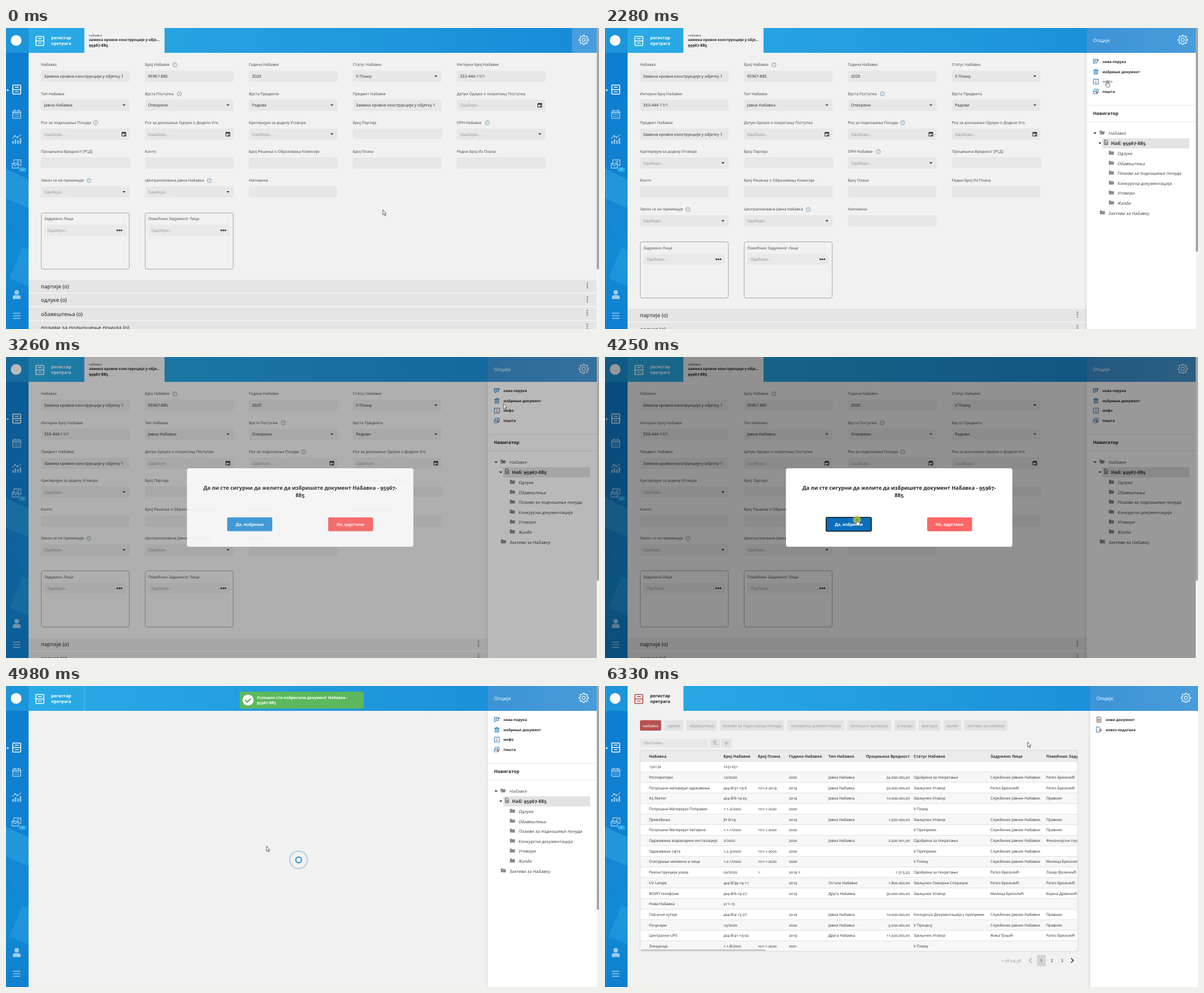
Recreate the animation shown at these times as an HTML page. Size 1051 px wide and 533 px high, loop 6420 ms.

```html
<!DOCTYPE html>
<html lang="sr">
<head>
<meta charset="utf-8">
<title>Регистар</title>
<style>
html,body{margin:0;height:100%;overflow:hidden;background:#f1f1f1}
svg{display:block;width:100vw;height:100vh}
text{font-family:'Noto Sans','Open Sans',sans-serif;text-rendering:geometricPrecision;white-space:pre}
.b{font-weight:700}
.o{font-variant-numeric:oldstyle-nums}
</style>
</head>
<body>
<svg id="stage" viewBox="0 0 1051 533"></svg>
<script>
const LOOP = 6420;
const rect = (x, y, w, h, fill, rx = 0, more = '') =>
  `<rect x="${x}" y="${y}" width="${w}" height="${h}" fill="${fill}" rx="${rx}" ${more}/>`;
const path = (d, fill, stroke = 'none', width = 1) =>
  `<path d="${d}" fill="${fill}" stroke="${stroke}" stroke-width="${width}"/>`;
const circle = (x, y, r, fill, stroke = 'none', width = 1) =>
  `<circle cx="${x}" cy="${y}" r="${r}" fill="${fill}" stroke="${stroke}" stroke-width="${width}"/>`;
const at = (x, y, body, more = '') => `<g transform="translate(${x} ${y})" ${more}>${body}</g>`;
const group = (id, body, more = '') => `<g id="${id}" ${more}>${body}</g>`;
// y is the middle of the capitals
const text = (x, y, s, size, fill = '#333', cls = 'o', more = '') =>
  `<text x="${x}" y="${(y + size * .36).toFixed(2)}" font-size="${size}" fill="${fill}" class="${cls}" ${more}>${s}</text>`;
const slanted = (x, y, s, size, fill) =>
  `<g transform="translate(${x} ${y + size * .36}) skewX(-11)">${text(0, -size * .36, s, size, fill)}</g>`;
const middle = 'text-anchor="middle"';
const dots = (x, y, dx, dy, r, fill) => [-1, 0, 1].map(i => circle(x + i * dx, y + i * dy, r, fill)).join('');
const caret = (x, y, fill = '#222') => path(`M${x - 2.6} ${y - 1.2}h5.2l-2.6 2.7z`, fill);

// ---- icons, centred on 0,0
const cabinet = c => rect(-7, -8, 14, 16, 'none', 1.5, `stroke="${c}" stroke-width="1.6"`) +
  path('M-7 0H7M-2.5 -3.2v-1h5v1M-2.5 4.6v-1h5v1', 'none', c, 1.4);
const folder = c => path('M-4.5 -3.4h3.4l1 1.2h4.6v5.6h-9z', c);
const openFolder = c => path('M-4.5 3.2v-6.4h3.4l1 1.2h4v1.3h-6.4zM-3.7 3.4l1.8-4.2h7l-1.8 4.2z', c);
const gear = () => {
  const pts = Array.from({length: 32}, (_, i) => {
    const a = (i - .5) * Math.PI / 16, r = i % 4 < 2 ? 8.4 : 6.3;
    return `${(r * Math.cos(a)).toFixed(1)} ${(r * Math.sin(a)).toFixed(1)}`;
  });
  return path(`M${pts.join('L')}z`, 'none', '#fff', 1.2) + circle(0, 0, 2.8, 'none', '#fff', 1.2);
};
const calendar = c => rect(-7, -6, 14, 13, 'none', 1.5, `stroke="${c}" stroke-width="1.6"`) +
  path('M-7 -3H7M-3.5 -8.5v3M3.5 -8.5v3', 'none', c, 1.8) +
  path('M-4 0h2M-1 0h2M2 0h2M-4 3.5h2M-1 3.5h2M2 3.5h2', 'none', c, 1.7);
const smallCalendar = path('M-3.5 -2.8h7v6.3h-7zM-2 -4.2v1.5M2 -4.2v1.5', 'none', '#222', 1) +
  rect(-3.5, -3, 7, 2, '#222') + rect(.3, .6, 2, 2, '#222');
const chart = c => path('M-6.5 8v-5M-2.2 8v-8M2.2 8v-6M6.5 8v-10', 'none', c, 2.6) +
  path('M-8 -1L-3 -6L1 -3L8 -8', 'none', c, 1.3) + circle(-3, -6, 1.4, c) + circle(1, -3, 1.4, c);
const mails = c => path('M-8 -1.5h11v8.5h-11zl5.5 4.5l5.5 -4.5M-5 -2v-5.5h12.5v9.5h-3.5M0 -4.5h5', 'none', c, 1.4);

// ---- sidebar and top bar
const dim = 'rgba(255,255,255,.58)';
const sidebar = rect(0, 0, 40, 533, 'url(#side)') +
  path('M0 249L40 268V319L0 302z', 'rgba(70,185,235,.35)') +
  path('M0 302L40 319V390L0 340z', 'rgba(30,140,215,.3)') +
  path('M29 389L40 392V458L6 443z', 'rgba(60,175,235,.3)') +
  rect(0, 0, 40, 44, '#1c95da') + circle(18, 22, 9.5, '#fff') +
  circle(3, 110, 1.6, '#fff') + at(19, 109, cabinet('#fff')) +
  at(19, 153, calendar(dim)) + at(19, 197, chart(dim)) + at(19, 241, mails(dim)) +
  rect(22.5, 247, 13, 7.5, '#2bace4', 3.7) + text(29, 250.7, '3', 4.6, '#fff', '', middle) +
  at(19, 472, circle(0, -4, 4, dim) + path('M-7 8v-3q0-4 4-4h6q4 0 4 4v3z', dim)) +
  path('M12.5 505h13M12.5 509.5h13M12.5 514h13', 'none', dim, 1.7);
const registerTab = (icon, ink) => at(60, 23, cabinet(icon)) +
  text(80, 17, 'регистар', 7.5, ink, 'b') + text(80, 27.5, 'претрага', 7.5, ink, 'b');
const topBar = rect(40, 0, 1007, 44, 'url(#top)') + registerTab('#fff', '#fff') +
  rect(138.5, 0, .8, 44, 'rgba(255,255,255,.35)');
const documentTab = rect(139, 0, 142, 44, '#f1f1f1') + text(147, 12.5, 'набавка', 5.7, '#444') +
  text(147, 21, 'замена кровне конструкције у обје...', 6.5, '#222', 'b') +
  text(147, 30.5, '95967-885', 6.9, '#222', 'b o');

// ---- form: label|value|kind (v select, d date, w wide)|help offset
const pick = 'Одабери...';
const fields = `Набавка|Замена кровне конструкције у објетку 1
Број Набавке|95967-885||53
Година Набавке|2020
Статус Набавке|У Плану|v
Интерни Број Набавке|333-444-11/1
Тип Набавке|Јавна Набавка|v
Врста Поступка|Отворени|v|61
Врста Предмета|Радови|v
Предмет Набавке|Замена кровне конструкције у објетку 1
Датум Одлуке о покретању Поступка|${pick}|d
Рок за подношење Понуда|${pick}|d|97
Рок за доношење Одлуке о Додели Уго.|${pick}|d
Критеријум за доделу Уговора|${pick}|v
Број Партија||w
ОРН Набавке|${pick}|v|54
Процењена Вредност [РСД]||w
Конто
Број Решења о Образовању Комисије
Број Плана
Редни Број Из Плана
Закон се не примењује|${pick}|v|85
Централизована Јавна Набавка|${pick}|v|114
Напомена`.split('\n').map(s => s.split('|'));
const ink = s => s === pick ? '#999' : '#333';
const field = ([label, value = '', kind, help]) =>
  text(0, 65, label, 6.75, '#4a4a4a', '') +
  rect(0, 75.5, kind === 'w' ? 158.5 : 157, kind === 'w' ? 18.5 : 20, '#e7e7e7', 2) +
  text(5.5, 85.6, value, 7.2, ink(value), '') +
  (kind === 'v' ? caret(147, 85.4) : kind === 'd' ? at(147, 85.5, smallCalendar) : '') +
  (help ? circle(help, 65.3, 3.7, 'none', '#5d87a3', .8) + text(help, 65.4, '?', 5.6, '#5d87a3', '', middle) : '');
const personBox = (x, title) => at(x, 0,
  rect(.5, 327.5, 156, 99.5, 'none', 3.5, 'stroke="#9a9a9a" stroke-width=".9"') +
  text(6, 338, title, 6.75, '#4a4a4a', '') + rect(6, 348.5, 145, 19.5, '#e9e9e9', 2) +
  text(11.5, 358.2, pick, 7.1, '#999', '') + dots(139, 358.3, 3.6, 0, 1.5, '#333'));
const sections = ['партије (0)', 'одлуке (0)', 'обавештења (0)', 'позиви за подношење понуда (0)'];
const form = (cols, right) => {
  const shift = cols === 4 ? 51.2 : 0;
  return rect(40, 44, right - 40, 489, '#f1f1f1') +
    fields.map((f, i) => at(62 + i % cols * 184.25, Math.floor(i / cols) * 51.2, field(f))).join('') +
    at(0, shift, personBox(62, 'Задужено Лице') + personBox(246.2, 'Помоћник Задуженог Лица') +
      sections.map((s, i) => at(0, i * 24.15, rect(40, 446.3, right - 40, 22, '#e5e5e5') +
        text(62, 457.8, s, 9.6, '#222') + dots(right - 16.7, 456, 0, 4, 1.5, '#999'))).join(''));
};

// ---- side panels
const panelBase = (x, right) => rect(x - 6, 44, 6, 489, 'url(#shade)') + rect(x, 44, right - x, 489, '#fff') +
  rect(x, 0, right - x, 44, 'url(#panelTop)') + text(x + 11, 22, 'Опције', 8.5, '#fff');
const blue = '#1878b8', red = '#d33f3f';
const optionIcons = [
  path('M-4.5 -4h7v6h-4l-2 2v-2h-1zM-2.8 -2h4M-2.8 0h3', 'none', blue, 1) + circle(3.6, -2.5, 1.4, red),
  path('M-3 -2.2h6v6.7h-6zM-4.5 -2.6h9M-1.5 -4.3h3M-1 -1v4M1 -1v4', 'none', blue, 1.1),
  path('M-4.3 -4.3h8.6v8.6h-8.6z', 'none', blue, 1) + path('M0 -1v3.5M0 -2.9v1', 'none', red, 1.2),
  `<g transform="scale(.58)">${mails(blue)}</g>` + circle(2.2, 2, 1.6, red),
  path('M-3.5 -4.5h5l2 2v7h-7z', 'none', '#444', 1) + path('M0 -1.8v4.6M-2.2 .6h4.4', 'none', red, 1.3),
  path('M-4.5 -4.5h4.5l2 2v7h-6.5z', 'none', blue, 1) + path('M-1 1h6M3 -1l2 2l-2 2', 'none', red, 1)
];
const option = (x, y, icon, label, id) => at(x, y, optionIcons[icon]) +
  text(x + 11.7, y, label, 6.45, '#222', 'b', `id="${id}"`);
const rule = y => rect(854, y, 193, .8, '#dedede');
const tree = ['Одлуке', 'Обавештења', 'Позиви за подношење понуда', 'Конкурсна документација', 'Уговори', 'Жалбе'];
const panel = panelBase(854, 1047) +
  ['нова порука', 'избриши документ', 'инфо', 'пошта'].map((s, i) => option(870, 59.6 + i * 17.65, i, s, 'opt' + i)).join('') +
  rule(136.5) + text(865, 151.5, 'Навигатор', 8, '#222', 'b') + rule(165.7) +
  caret(868.5, 186.2) + at(881, 185, openFolder('#888')) + slanted(892, 186.3, 'Набавке', 7.6, '#555') +
  rect(881.5, 195.3, 154, 18, '#e3e3e3') + caret(877, 204) +
  at(888, 202.5, path('M-2.8 -4h3.8l1.8 2v6h-5.6zM-1.4 0h2.8M-1.4 2h2.8', 'none', '#444', 1)) +
  text(897, 204.3, 'Наб: 95967-885', 8.2, '#333', 'b o') +
  tree.map((s, i) => at(897.5, 221 + i * 17.6, folder('#8c8c8c')) + slanted(908, 222.2 + i * 17.6, s, 7.55, '#444')).join('') +
  at(881.5, 326.5, folder('#8c8c8c')) + slanted(892, 327.8, 'Захтеви за Набавку', 7.55, '#444');

// ---- search page
const tabs = [['набавке', 62, 37.5], ['одлуке', 105.5, 33], ['обавештења', 144.5, 53.5],
  ['позиви за подношење понуда', 203.5, 114], ['конкурсна документација', 323, 101.5],
  ['питања и одговори', 429.5, 77.5], ['уговори', 513, 37.5], ['фактуре', 556, 38.5],
  ['жалбе', 600, 31], ['захтеви за набавку', 636.5, 76.5]];
const columns = [78, 210, 271, 326, 396, 540, 547, 683, 782];
const heads = 'Набавка|Број Набавке|Број Плана|Година Набавке|Тип Набавке|Процењена Вредност|Статус Набавке|Задужено Лице|Помоћник Задуженог Лица';
const clerk = 'Службеник Јавних Набавки', officer = 'Ратко Брезолић', lady = 'Милица Брезолић';
const open = 'Јавна Набавка', other = 'Друга Набавка', signed = 'Закључен Уговор', approved = 'Одобрена за покретање';
const rows = `132132|1231231
Респиратори|12/2020||2020|${open}|24.000.000,00|${approved}|${clerk}|${officer}
Потрошни материјал одржавање|404-8/31-19-6|101-2-2019|2019|${open}|50.000.000,00|${signed}|${officer}|${officer}
A3 Skener|404-8/6-19-25||2019|${open}|10.000.000,00|${signed}|${clerk}|Правник
Потрошни Материјал Поправке|1.1.2/2020|101-1-2020|2020|||У Плану
Превођење|ЈН 6/19||2019|${open}|1.500.000,00|${signed}|${clerk}|Правник
Потрошни Материјал Хигијена|1.1.1/2020|101-1-2020|2020|||У Припреми|${clerk}|Правник
Одржавање водоводних инсталација|2/2020||2020|${open}|2.500.001,00|${approved}|${clerk}|Финансијски службеник
Одржавање сајта|1.2.3/2020|101-1-2020|2020|||У Припреми|${clerk}
Осигурање имовине и лица|1.2.1/2020|101-1-2020|2020|||У Плану|${clerk}|${lady}
Реконструкција улаза|02/2020|1|2019.1||1.515,55|${approved}|${officer}|Лазар Врлинкић
UV Lampe|404-8/39-19-11||2019|Остале Набавке|1.800.000,00|Закључен Оквирни Споразум|${officer}|${officer}
ВОИП телефони|404-8/6-19-27||2019|${other}|30.000.000,00|${signed}|${lady}|Бојана Дрвенкић
Нова Набавка|211-15
Гласачке кутије|404-8/4-13-27||2019|${open}|10.000.000,00|Конкурсна Документација у припреми|${clerk}|Правник
Рачунари|15/2020||2020|${open}|5.000.000,00|У Процесу|${clerk}|Правник
Централни UPS|404-8/41-19-02||2019|${other}|11.500.000,00|${signed}|Жика Трњић|${officer}
Линценце|1.1.8/2020|101-1-2020|2021|||У Плану`.split('\n');
const cells = (line, y, size, cls) => line.split('|').map((s, i) =>
  s && text(columns[i], y, s, size, '#333', cls, i === 5 ? 'text-anchor="end"' : '')).join('');
const table = rect(62, 114, 776, 356, '#fff') + rect(62, 114, 776, 19.4, '#ebebeb') + cells(heads, 124, 6.95, 'b') +
  rows.map((r, i) => rect(62, 133.4 + i * 18.7, 776, 18.7, i % 2 ? '#f7f7f7' : '#fff') +
    rect(62, 133 + i * 18.7, 776, .8, '#dadada') + cells(r, 142.8 + i * 18.7, 6.6, 'o')).join('') +
  rect(64, 466.6, 221, 2.4, '#c2c2c2', 1);
const search = rect(40, 0, 1011, 533, '#f1f1f1') + rect(139, 0, 912, 44, 'url(#top)') +
  registerTab('#b04a48', '#222') +
  tabs.map(([s, x, w], i) => rect(x, 60.5, w, 18.5, i ? '#e3e3e3' : '#b8504f', 2) +
    text(x + w / 2, 70, s, 7.05, i ? '#9b9b9b' : '#fff', '', middle)).join('') +
  rect(62, 93, 121, 16, '#e8e8e8', 2) + slanted(68, 101, 'Претражи...', 6.7, '#999') +
  rect(186, 93, 18, 16, '#e2e2e2', 2) + path('M191 97.5h7l-2.7 3.2v3.8l-1.6-1.2v-2.6zM197 102l3 3m0-3l-3 3', '#bbb', '#bbb', .8) +
  rect(206, 93, 18, 16, '#e2e2e2', 2) + path('M215 97.2v7.6M211.2 101h7.6', 'none', '#b5b5b5', 1.6) +
  `<g clip-path="url(#tableClip)">${table}</g>` +
  rect(62, 114, 776, 356, 'none', 2, 'stroke="#cfcfcf" stroke-width=".8"') +
  text(702, 486.3, '1-18 од 38', 7.4, '#999') + path('M756 482l-4 4l4 4', 'none', '#999', 1.2) +
  rect(765.5, 476.3, 15.5, 20, '#d4d4d4', 2) +
  [773, 791.8, 810].map((x, i) => text(x, 486.3, i + 1, 7.4, '#333', '', middle)).join('') +
  path('M826 482l4 4l-4 4', 'none', '#222', 1.4) +
  panelBase(860, 1051) + option(875.5, 59.6, 4, 'нови документ', 'new') + option(875.5, 77.2, 5, 'извоз података', 'export') +
  at(1029.5, 21, gear());

// ---- dialog, toast, spinner, pointer
const dialog = rect(320.7, 197, 401.3, 139, '#fff', 4) +
  text(521.3, 231.5, 'Да ли сте сигурни да желите да избришете документ Набавка - 95967-', 9.27, '#222', 'b o', middle) +
  text(521.3, 244.5, '885', 9.27, '#222', 'b o', middle) +
  rect(392, 284, 80, 24.5, '#3498db', 2, 'id="yes"') + text(432, 296.4, 'Да, избриши', 7.25, '#fff', 'b', middle) +
  rect(571, 284, 79.6, 24.5, '#ff6666', 2) + text(610.6, 296.4, 'Не, одустани', 7.25, '#fff', 'b', middle);
const toast = rect(414, 10, 220, 30, '#5cb85c', 3) + circle(429, 25, 9.8, '#fff') +
  path('M424 25l3.6 3.6l6.4-6.6', 'none', '#5cb85c', 2.4) +
  text(444.5, 20.5, 'Успешно сте избрисали документ Набавка -', 6.95, '#fff', 'b') +
  text(444.5, 29.3, '95967-885', 6.95, '#fff', 'b o');
const spinner = `<circle id="outer" cx="518.6" cy="307.8" r="16" fill="none" stroke="#abd0ea" stroke-width="2"/>` +
  `<circle id="inner" cx="518.6" cy="307.8" r="5.7" fill="none" stroke="#2b95d3" stroke-width="2"/>`;
const arrow = path('M0 0V9L2 7.2L3.6 10.5L5 9.9L3.5 6.6H6z', '#fff', '#333', .8);
const hand = path('M-.9 .8q.9-1.4 1.8 0V5l3.2.8q1 .3.8 1.4L4.3 10q-.3 1.6-1.6 1.6h-2.4q-1 0-1.6-1L-3.4 7.4q-.1-1.3 1.2-.9L-.9 7.4z', '#fff', '#333', .8);

const gradient = (id, stops, more = '') => `<linearGradient id="${id}" ${more}>` +
  stops.map(([o, c, a = 1]) => `<stop offset="${o}" stop-color="${c}" stop-opacity="${a}"/>`).join('') + '</linearGradient>';
document.getElementById('stage').innerHTML = '<defs>' +
  gradient('top', [[0, '#2aabe5'], [1, '#188ad7']], 'gradientUnits="userSpaceOnUse" x1="40" x2="1047"') +
  gradient('side', [[0, '#0d7dd0'], [.45, '#1080d0'], [.75, '#128ad4'], [1, '#0f80d0']], 'x2="0" y2="1"') +
  gradient('panelTop', [[0, '#3c93d6'], [1, '#489cda']]) +
  gradient('shade', [[0, '#000', 0], [1, '#000', .05]]) +
  '<clipPath id="tableClip"><rect x="62" y="114" width="775.5" height="356" rx="2"/></clipPath></defs>' +
  rect(0, 0, 1051, 533, '#f1f1f1') + group('topBar', topBar) + group('documentTab', documentTab) +
  group('wide', form(5, 1047)) + group('narrow', form(4, 854)) +
  rect(1003, 0, 44, 44, '#489edc') + group('panel', panel) + at(1024, 21, gear()) +
  rect(1047, 0, 4, 533, '#f4f4f4') + rect(1047, 0, 4, 427, '#a6a6a6', 0, 'id="thumb"') +
  group('search', search) + sidebar + rect(0, 0, 1047, 533, '#000', 0, 'id="veil"') +
  group('dialog', dialog) + group('spinner', spinner) + group('toast', toast) +
  group('pointer', `<circle id="press" cx="-.5" cy="1.3" r="7" fill="#b4cc32" fill-opacity=".8"/>` +
    group('arrow', arrow) + group('hand', hand));

const el = Object.fromEntries([...document.querySelectorAll('[id]')].map(e => [e.id, e]));
const show = (id, on) => el[id].setAttribute('display', on ? 'inline' : 'none');
const set = (id, name, value) => el[id].setAttribute(name, value);

const ticks = [0, ...[[140, 760, 9], [850, 1490, 9], [1580, 2220, 9], [2280, 2610, 5], [2760, 2840, 2],
  [3000, 3640, 9], [3700, 3790, 2], [3950, 4020, 2], [4250, 4430, 3], [4580, 5170, 8], [5240, 5240, 1],
  [5390, 5390, 1], [5530, 6100, 9], [6180, 6330, 3]].flatMap(([a, b, n]) =>
  Array.from({length: n}, (_, i) => n > 1 ? a + (b - a) * i / (n - 1) : a))];

const track = (keys, t) => {
  const i = keys.findIndex(k => k[0] > t);
  if (i < 0) return keys.at(-1).slice(1);
  if (i === 0) return keys[0].slice(1);
  const [a, b] = [keys[i - 1], keys[i]], p = (t - a[0]) / (b[0] - a[0]);
  return a.slice(1).map((v, j) => v + (b[j + 1] - v) * p);
};
const pointerKeys = [[70, 668, 322], [450, 850, 175], [760, 1004, 46], [930, 1016, 20], [1580, 1015, 22],
  [2220, 890, 93], [2280, 890, 93], [2610, 893, 79.5], [3000, 893, 79.5], [3090, 894, 81], [3260, 880, 83],
  [3640, 487, 278], [3790, 449, 283], [3950, 449, 285], [4020, 447, 287], [4430, 447, 287], [4580, 455, 286],
  [4980, 463, 283], [5170, 500, 270], [5240, 560, 235], [5390, 597, 213], [5530, 604, 208],
  [6100, 744, 101], [6330, 749, 99]];
const panelKeys = [[1090, 193], [1170, 140], [1250, 75], [1330, 25], [1410, 0]];
const veilKeys = [[3000, .02], [3090, .09], [3260, .3], [3400, .4], [4250, .4], [4430, 0]];
const dialogKeys = [[3000, .08], [3090, .4], [3260, .95], [3340, 1], [4250, 1], [4430, 0]];
const toastKeys = [[4510, 0], [4750, 1], [5480, 1], [5680, 0]];

function render(now) {
  const t = ticks.findLast(k => k <= now + .01), within = (a, b) => t >= a && t < b;
  const searching = t >= 5240, reflowed = t >= 1170;
  show('topBar', !searching);
  show('documentTab', t < 4580);
  show('wide', !reflowed);
  show('narrow', reflowed && t < 4430);
  show('panel', within(1090, 5240));
  set('panel', 'transform', `translate(${track(panelKeys, t)[0]} 0)`);
  set('thumb', 'height', reflowed ? 396 : 427);
  show('search', searching);
  const asking = within(3000, 4430);
  show('veil', asking);
  set('veil', 'opacity', track(veilKeys, t)[0]);
  show('dialog', asking);
  set('dialog', 'opacity', track(dialogKeys, t)[0]);
  set('yes', 'fill', t >= 4250 ? '#0b6fbb' : t >= 3950 ? '#2a8bcd' : '#3498db');
  set('yes', 'stroke', t >= 4250 ? '#111' : 'none');
  set('yes', 'stroke-width', 1.6);
  set('opt1', 'fill', within(2400, 3000) ? '#8a8a8a' : '#222');
  set('opt2', 'fill', within(2200, 2400) ? '#8a8a8a' : '#222');
  show('spinner', within(4430, 5240));
  const pulse = Math.sin((t - 4980) / 1000 * Math.PI * 2);
  set('outer', 'r', 16 + pulse);
  set('inner', 'r', 5.7 + pulse * 1.5);
  set('toast', 'opacity', track(toastKeys, t)[0]);
  const [x, y] = track(pointerKeys, t);
  set('pointer', 'transform', `translate(${x} ${y})`);
  const pointing = within(850, 1600) || within(2200, 3000) || within(3950, 4430);
  show('hand', pointing);
  show('arrow', !pointing);
  show('press', within(930, 1010) || within(2760, 2840) || within(4250, 4340));
}

const start = performance.now();
function frame() {
  render((performance.now() - start) % LOOP);
  requestAnimationFrame(frame);
}
frame();
</script>
</body>
</html>
```
